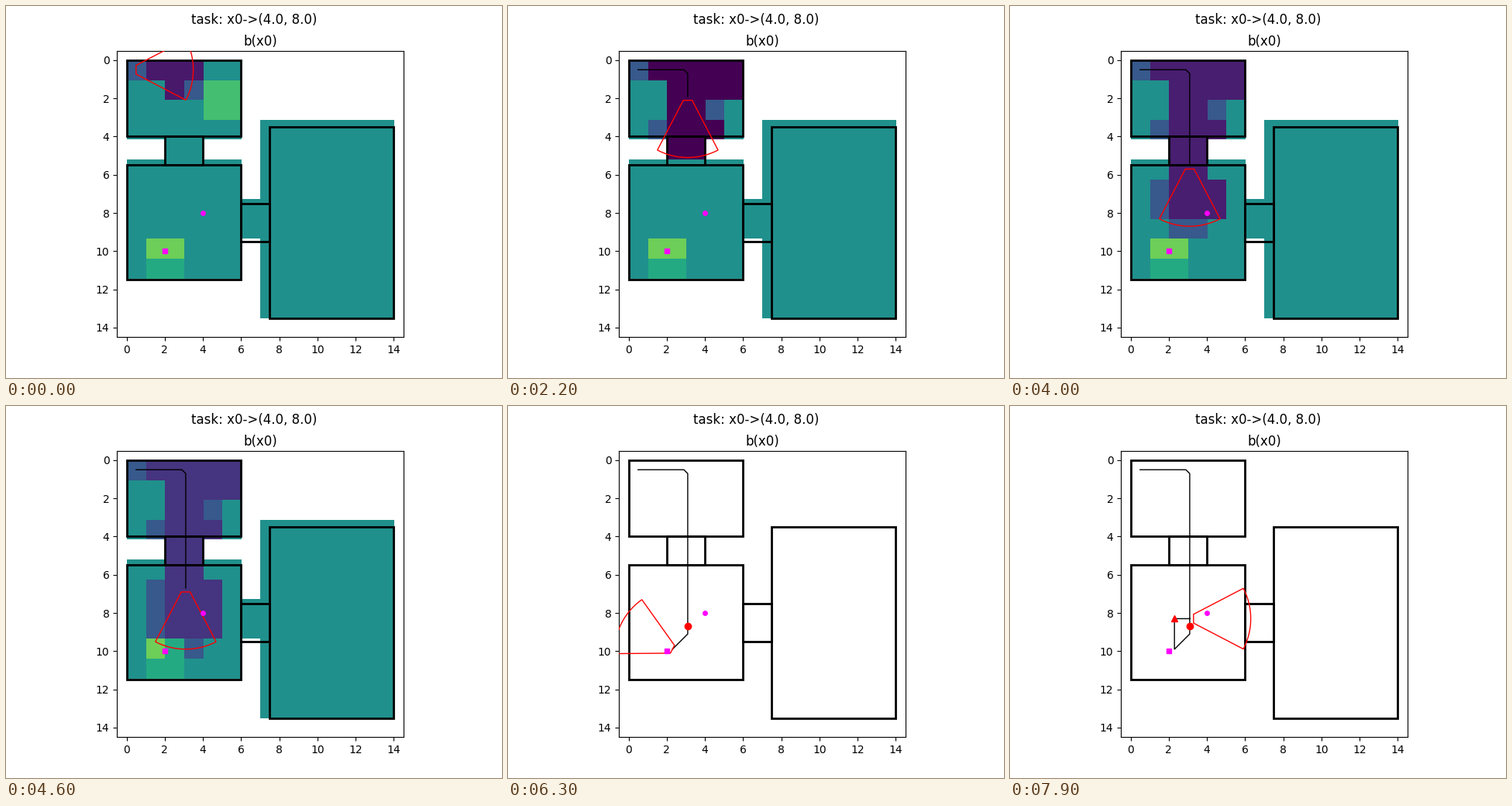
These frames come from a looping animation (640 px wide and 480 px high, 8 s). A matplotlib script:

```python
import numpy as np
import matplotlib.pyplot as plt
from matplotlib.animation import FuncAnimation
from matplotlib.patches import Polygon, Rectangle

FRAMES, INTERVAL = 80, 100
ROWS, COLS, HEIGHT = 13, 14, 13.5
DETECTED, REACHED, PLACED = 48, 55, 72
STEP, MAX_TURN = 0.2, 72
NEAR, FAR, HALF_ANGLE = 0.5, 3.44, 0.48

# belief levels on a 0..1 colour scale
PLAIN, PARTIAL, MILD, WARM, HOT = 0.5, 0.28, 0.61, 0.7, 0.78

# (heading in degrees, number of steps); y points down
LEGS = [(0, 12), (45, 1), (90, 42), (135, 4), (270, 8), (360, 5)]


def plan_poses():
    x, y, heading = 0.5, 0.5, 0
    poses = [(x, y, heading)]
    for goal, steps in LEGS:
        while heading != goal:
            heading = min(goal, heading + MAX_TURN)
            poses.append((x, y, heading))
        dx, dy = np.round([np.cos(np.radians(goal)), np.sin(np.radians(goal))])
        for _ in range(steps):
            x, y = x + STEP * dx, y + STEP * dy
            poses.append((x, y, heading))
    return np.array(poses)


def cone_apex(pose):
    x, y, angle = pose[0], pose[1], np.radians(pose[2])
    back = NEAR * np.cos(HALF_ANGLE)
    return x - back * np.cos(angle), y - back * np.sin(angle), angle


def cone_outline(pose):
    ax0, ay0, angle = cone_apex(pose)
    arc = angle + np.linspace(-HALF_ANGLE, HALF_ANGLE, 16)
    angles = np.r_[angle - HALF_ANGLE, arc, angle + HALF_ANGLE]
    radii = np.r_[NEAR, np.full(16, FAR), NEAR]
    return np.c_[ax0 + radii * np.cos(angles), ay0 + radii * np.sin(angles)]


def sensed_fractions(poses, samples=8):
    """Share of each grid cell seen so far, for every pose until detection."""
    offsets = (np.arange(samples) + 0.5) / samples
    gx = (np.arange(COLS)[:, None] + offsets).ravel()
    gy = (np.arange(ROWS)[:, None] + offsets).ravel() * HEIGHT / ROWS
    gx, gy = np.meshgrid(gx, gy)
    seen = np.zeros(gx.shape, bool)
    result = []
    for pose in poses[:DETECTED]:
        if pose[2] % 90 == 0:
            ax0, ay0, angle = cone_apex(pose)
            dx, dy = gx - ax0, gy - ay0
            bearing = np.arctan2(dy, dx) - angle
            radius = np.hypot(dx, dy)
            seen |= (abs(bearing) < HALF_ANGLE) & (radius > NEAR) & (radius < FAR)
        cells = seen.reshape(ROWS, samples, COLS, samples).mean(axis=(1, 3))
        cells[5, :2] = cells[5, 4:] = 0  # hidden behind the passage walls
        result.append(cells)
    return result


def free_cells():
    free = np.zeros((ROWS, COLS), bool)
    free[0:4, 0:6] = free[4, 2:4] = free[5:11, 0:6] = True
    free[7:9, 6] = free[3:13, 7:14] = True
    return free


def belief_grid(n):
    if n >= REACHED:
        return np.ma.masked_all((ROWS, COLS))
    if n >= DETECTED:
        return np.ma.array(np.zeros((ROWS, COLS)), mask=~FREE)
    level = np.full((ROWS, COLS), PLAIN)
    level[9, 1:3], level[10, 1:3] = HOT, MILD
    if n < 16:
        level[1, 4:6] = level[2, 5] = WARM
    if n < 8:
        level[2, 4] = WARM
    else:
        level[2, 3] = PARTIAL
    seen = SEEN[n]
    partly = (seen > 0.25) & (seen < 0.49)
    level[partly] = np.where(level[partly] == HOT, MILD, PARTIAL)
    level[seen >= 0.49] = np.interp(n, [0, 12, 32, 46], [0.07, 0, 0, 0.15])
    return np.ma.array(level, mask=~FREE)


POSES = plan_poses()
SEEN = sensed_fractions(POSES)
FREE = free_cells()

fig, ax = plt.subplots(figsize=(6.4, 4.8), dpi=100)
fig.suptitle("task: x0->(4.0, 8.0)", y=0.982)
ax.set_title("b(x0)", pad=5)

belief = ax.imshow(belief_grid(0), extent=(0, COLS, HEIGHT, 0),
                   cmap="viridis", vmin=0, vmax=1)
ax.set(xlim=(-0.5, 14.5), ylim=(14.5, -0.5), aspect="equal")
ax.set_xticks(range(0, 15, 2))
ax.set_yticks(range(0, 15, 2))

for x, y, w, h in [(0, 0, 6, 4), (0, 5.5, 6, 6), (7.5, 3.5, 6.5, 10),
                   (2, 4, 2, 1.5), (6, 7.5, 1.5, 2)]:
    ax.add_patch(Rectangle((x, y), w, h, fill=False, lw=2, zorder=2))

path, = ax.plot([], [], color="black", lw=1, zorder=3)
cone = ax.add_patch(Polygon(cone_outline(POSES[0]), fill=False,
                            edgecolor="red", lw=1, zorder=4))
ax.plot(4, 8, "o", color="magenta", ms=4, zorder=5)
ax.plot(2, 10, "s", color="magenta", ms=5, zorder=5)
reached, = ax.plot(*POSES[REACHED, :2], "ro", zorder=6)
placed, = ax.plot(*POSES[PLACED, :2], "r^", zorder=6)


def update(n):
    belief.set_data(belief_grid(n))
    path.set_data(POSES[:n, 0], POSES[:n, 1])
    cone.set_xy(cone_outline(POSES[n]))
    reached.set_visible(n >= REACHED)
    placed.set_visible(n >= PLACED)
    return belief, path, cone, reached, placed


anim = FuncAnimation(fig, update, frames=FRAMES, interval=INTERVAL,
                     repeat=True, repeat_delay=0)
plt.show()
```
